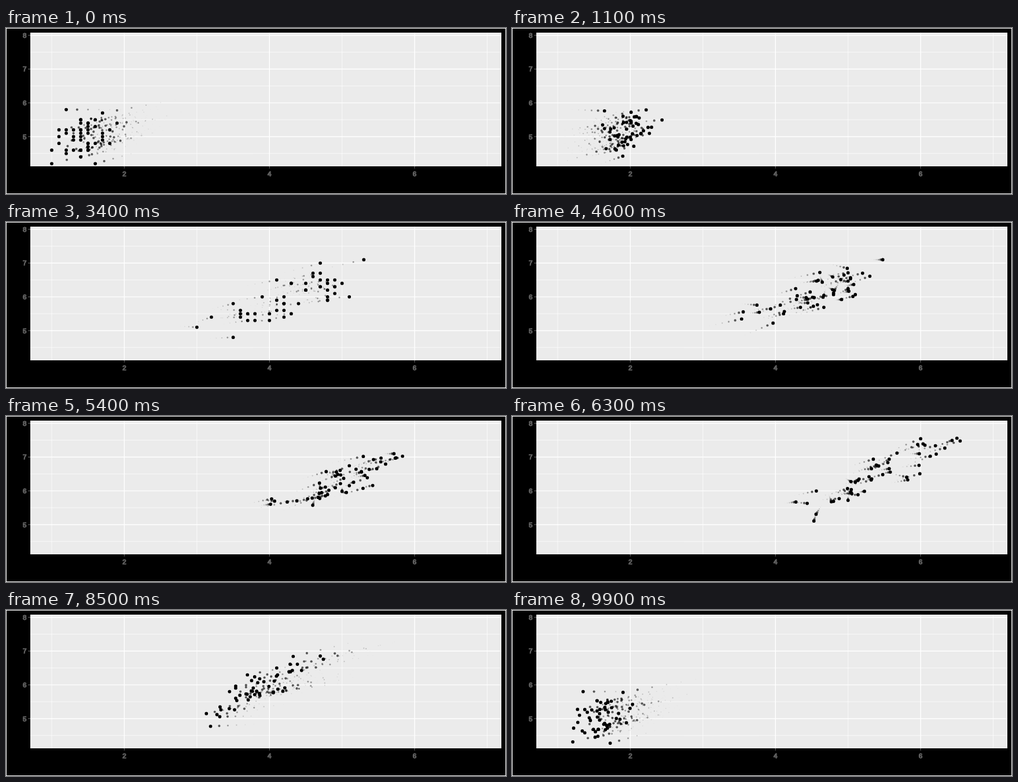
These frames come from a looping animation (864x288 px, 10 s). An HTML page with a canvas:

```html
<!DOCTYPE html>
<html lang="en">
<head>
<meta charset="utf-8">
<title>Iris states</title>
<style>
  html, body { margin: 0; width: 100%; height: 100%; overflow: hidden; background: #000; }
  canvas { display: block; width: 864px; height: 288px; }
</style>
</head>
<body>
<canvas id="stage" width="864" height="288"></canvas>
<script>
const W = 864, H = 288;
const STEP = 100, FRAMES = 100;
const COUNT = 50, WAKE = 7;
const panel = { left: 42, top: 8, right: 856, bottom: 240 };
const ctx = document.getElementById('stage').getContext('2d');

// Mean and spread of petal (x) and sepal (y) length per species, and their correlation
const species = [
  { x: 1.46, sx: 0.17, y: 5.01, sy: 0.35, r: 0.27 },
  { x: 4.26, sx: 0.47, y: 5.94, sy: 0.52, r: 0.75 },
  { x: 5.55, sx: 0.55, y: 6.59, sy: 0.64, r: 0.86 }
];

// Flowers on the rim of the clouds: [petal, sepal] in each state
const rim = [
  [[1.4, 5.1], [4.7, 7.0], [6.0, 6.3]],
  [[1.4, 4.6], [4.7, 6.3], [4.5, 4.9]],
  [[1.2, 5.8], [3.6, 5.6], [5.1, 5.8]],
  [[1.7, 5.7], [4.5, 6.2], [6.9, 7.7]],
  [[1.0, 4.6], [4.9, 6.3], [6.7, 7.7]],
  [[1.5, 5.4], [3.7, 5.5], [6.4, 7.9]],
  [[1.4, 5.5], [5.1, 6.0], [5.1, 6.3]],
  [[1.5, 5.3], [3.0, 5.1], [5.4, 6.2]]
];

// Linear moves between the resting states, in steps
const moves = [
  { start: 6, end: 33, from: 0, to: 1 },
  { start: 40, end: 67, from: 1, to: 2 },
  { start: 74, end: 100, from: 2, to: 0 }
];

let seed = 11;
function random() {
  seed = (Math.imul(seed, 1664525) + 1013904223) >>> 0;
  return seed / 2 ** 32;
}

// Bell-shaped value with mean 0 and spread 1
const bell = () => (random() + random() - 1) * Math.sqrt(6);
const tenth = v => Math.round(v * 10) / 10;

function sample({ x, sx, y, sy, r }) {
  const a = bell(), b = bell();
  return [tenth(x + sx * (r * a + Math.sqrt(1 - r * r) * b)), tenth(y + sy * a)];
}

const flowers = Array.from({ length: COUNT }, (_, i) => rim[i] || species.map(sample));

const scaleX = v => panel.left + (v - 0.705) / 6.49 * (panel.right - panel.left);
const scaleY = v => panel.bottom - (v - 4.12) / 3.96 * (panel.bottom - panel.top);
const mix = (a, b, f) => a + (b - a) * f;

function line(x1, y1, x2, y2, color, width) {
  ctx.strokeStyle = color;
  ctx.lineWidth = width;
  ctx.beginPath();
  ctx.moveTo(x1, y1);
  ctx.lineTo(x2, y2);
  ctx.stroke();
}

const gridX = (v, width) => line(scaleX(v), panel.top, scaleX(v), panel.bottom, '#fff', width);
const gridY = (v, width) => line(panel.left, scaleY(v), panel.right, scaleY(v), '#fff', width);

// Axis digits carry a pale fringe
function label(text, x, y, align) {
  ctx.font = '11.73px "Liberation Sans", Arial, sans-serif';
  ctx.textAlign = align;
  ctx.strokeStyle = '#858585';
  ctx.lineWidth = 1;
  ctx.strokeText(text, x, y);
  ctx.fillStyle = '#4d4d4d';
  ctx.fillText(text, x, y);
}

function drawChart() {
  ctx.fillStyle = '#fff';
  ctx.fillRect(0, 0, W, H);
  ctx.fillStyle = '#000';
  ctx.fillRect(1, 1, W - 2, H - 2);
  ctx.fillStyle = '#ebebeb';
  ctx.fillRect(panel.left, panel.top, panel.right - panel.left, panel.bottom - panel.top);

  for (let v = 4.5; v < 8; v++) gridY(v, 0.71);
  for (let v = 1; v < 8; v += 2) gridX(v, 0.71);
  for (let v = 5; v <= 8; v++) {
    const y = scaleY(v);
    gridY(v, 1.42);
    line(panel.left - 3.67, y, panel.left, y, '#555', 1.42);
    label(v, panel.left - 6.6, y + 4.2, 'right');
  }
  for (let v = 2; v <= 6; v += 2) {
    const x = scaleX(v);
    gridX(v, 1.42);
    line(x, panel.bottom, x, panel.bottom + 3.67, '#555', 1.42);
    label(v, x, 256.7, 'center');
  }
}

function drawPoints(step, strength) {
  const q = (step + FRAMES) % FRAMES;
  const { start, end, from, to } = moves.find(m => q <= m.end);
  const f = Math.max(0, (q - start) / (end - start));
  const radius = 2.134 * strength + 0.72;
  ctx.globalAlpha = strength;
  ctx.fillStyle = '#000';
  for (const flower of flowers) {
    const [x1, y1] = flower[from], [x2, y2] = flower[to];
    ctx.beginPath();
    ctx.arc(scaleX(mix(x1, x2, f)), scaleY(mix(y1, y2, f)), radius, 0, 2 * Math.PI);
    ctx.fill();
  }
  ctx.globalAlpha = 1;
}

// Earlier steps trail behind, shrinking and fading
function draw(step) {
  drawChart();
  for (let age = WAKE - 1; age >= 0; age--) {
    drawPoints(step - age, (1 - age / WAKE) ** 3);
  }
}

let shown = -1;
function tick() {
  const step = Math.floor(performance.now() / STEP) % FRAMES;
  if (step !== shown) draw(shown = step);
  requestAnimationFrame(tick);
}
tick();
</script>
</body>
</html>
```
